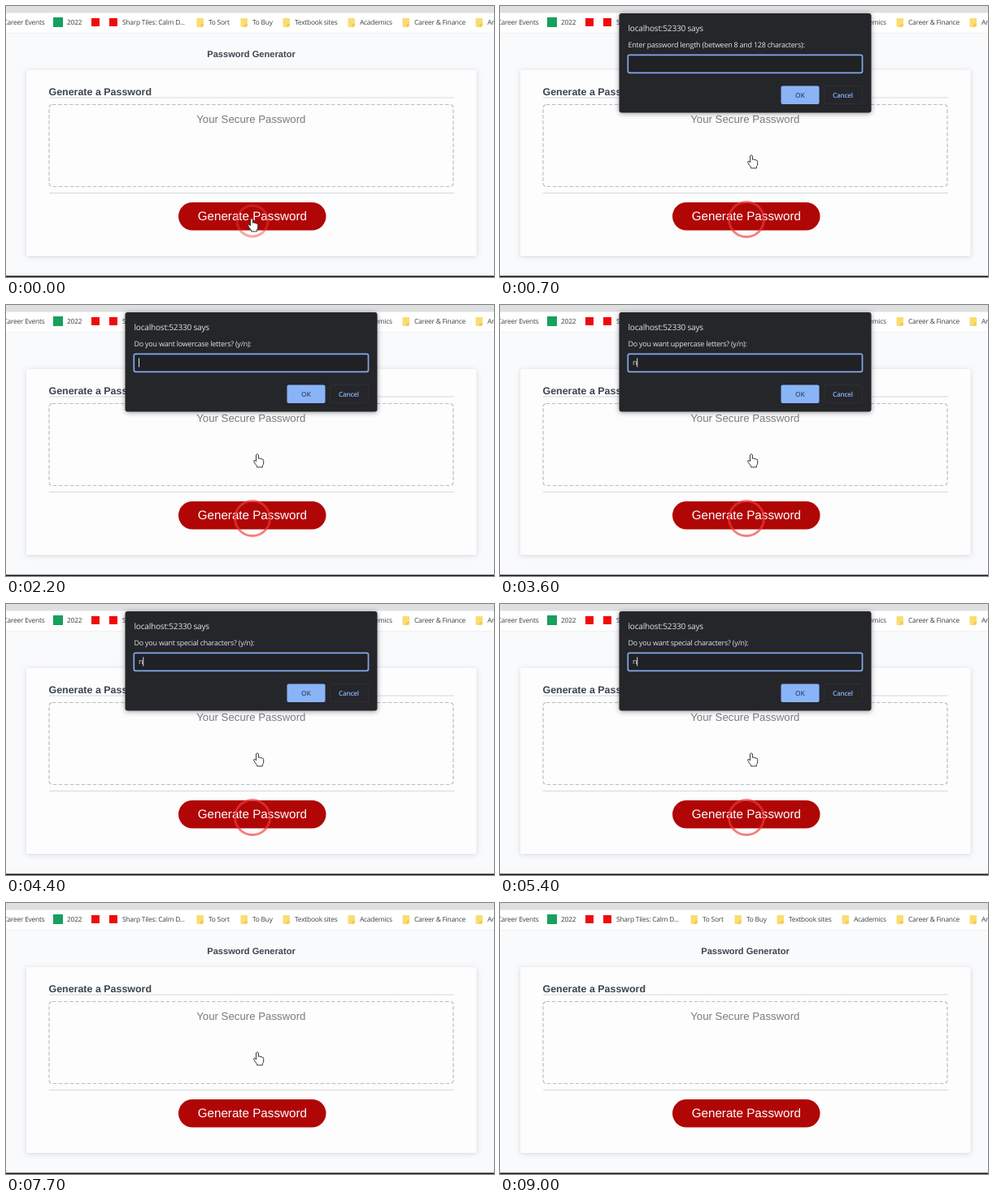
Animation, 600 px wide and 334 px high, one loop 9.2 s. Source, as an HTML page:

```html
<!DOCTYPE html>
<html lang="en">
<head>
<meta charset="utf-8">
<title>Password Generator</title>
<style>
  html, body { margin: 0; width: 100%; height: 100%; overflow: hidden; background: #f9fafc; }
  svg { display: block; width: 600px; height: 334px; }
  text { white-space: pre; text-rendering: geometricPrecision; }
  .ui { font-family: "Open Sans", sans-serif; letter-spacing: -.22px; }
  .page { font-family: "Liberation Sans", Arial, sans-serif; }
  .bold { font-weight: 700; fill: #3d4550; }
  .card { filter: drop-shadow(0 1px 3px rgba(40, 50, 70, .17)); }
  .dialog { filter: drop-shadow(0 1px 3px rgba(0, 0, 0, .4)); }
</style>
</head>
<body>
<svg viewBox="0 0 600 334">
  <rect width="600" height="34" fill="#fff"/>
  <rect width="600" height="8.5" fill="#dedfe0"/>
  <path d="M0 33.5H600" stroke="#eff1f3"/>
  <g id="bookmarks" class="ui" font-size="8.4" fill="#3c4043">
    <rect x="58" y="14" width="12" height="12" fill="#17a05e"/>
    <rect x="105" y="15" width="10" height="10" fill="#f00a0a"/>
    <rect x="127" y="15" width="10" height="10" fill="#f00a0a"/>
  </g>

  <g class="page">
    <text class="bold" x="301.5" y="63" font-size="11.1" text-anchor="middle">Password Generator</text>
    <rect class="card" x="25" y="79" width="553.5" height="229" rx="2" fill="#fdfdfe"/>
    <text class="bold" x="52.5" y="110" font-size="12.45">Generate a Password</text>
    <path d="M53 113H551M53 230.5H551" stroke="#d6d8dc"/>
    <rect x="53" y="121.5" width="497" height="101" rx="4" fill="none" stroke="#bbbcc4" stroke-width="1.2" stroke-dasharray="4.5 2.5"/>
    <text x="301.3" y="144" font-size="13.25" fill="#7b7b7d" text-anchor="middle">Your Secure Password</text>
    <rect x="212" y="242" width="181.5" height="34.5" rx="17.25" fill="#b00606"/>
    <text x="302.8" y="264.3" font-size="15.2" fill="#fff" text-anchor="middle">Generate Password</text>
  </g>
  <rect y="332.5" width="600" height="1.5" fill="#15161a"/>

  <circle id="ring" cx="303" fill="none" stroke="#f03c3c" stroke-width="3"/>

  <g id="dialog" class="ui">
    <rect class="dialog" x="146.5" y="9" width="310" height="122.5" rx="3" fill="#25262a"/>
    <text x="157.5" y="31" font-size="10.1" fill="#e3e4e6">localhost:52330 says</text>
    <text id="question" x="157.5" y="51" font-size="8.95" fill="#e3e4e6"></text>
    <rect x="157.3" y="60.3" width="288.2" height="22" rx="2" fill="#202125" stroke="#83a9ea" stroke-width="1.7"/>
    <text id="entry" x="163" y="74" font-size="8.9" fill="#e3e4e6"></text>
    <path id="caret" d="M.5 65.5V76.5" stroke="#e3e4e6"/>
    <rect x="345.5" y="98.5" width="47" height="22.5" rx="2" fill="#8ab4f8"/>
    <text x="368.8" y="112.7" font-size="8.3" font-weight="600" fill="#3a4a66" text-anchor="middle">OK</text>
    <rect x="398.5" y="98.5" width="47" height="22" rx="2" fill="none" stroke="#2d2f34"/>
    <text x="421.5" y="112.7" font-size="8.2" font-weight="600" fill="#8ab4f8" text-anchor="middle">Cancel</text>
  </g>

  <path id="cursor" fill="#fff" stroke="#303034" stroke-width=".95" stroke-linejoin="round"
    d="M-1.5 1.2Q0-.8 1.4 1.2V5.8Q2.8 4.7 3.9 6.2Q5.2 5.3 6 6.8Q7.4 6.2 7.7 8V11.5Q7.6 13.2 6.4 14.3V16.4H-.4V15Q-2.6 12.6-4.3 9.3Q-4.6 7.6-2.9 7.9L-1.5 9.4Z"/>
</svg>
<script>
const $ = id => document.getElementById(id);
const LOOP = 9200, CLOSE = 6400, HIDE = 8600;

const bookmarks = [
  [75, '2022'], [143, 'Sharp Tiles: Calm D...'], [249, 'To Sort', 1], [303, 'To Buy', 1],
  [355, 'Textbook sites', 1], [435, 'Academics', 1], [502, 'Career & Finance', 1], [592, 'Art', 1]
];
const label = (x, text, anchor = 'start') =>
  `<text x="${x}" y="23.3" text-anchor="${anchor}">${text.replace('&', '&amp;')}</text>`;
const folder = x => `<path d="M${x} 15h7.5q1 0 1 1v9q0 1-1 1h-6.5q-1 0-1-1z" fill="#fbdc72"/>
  <path d="M${x + 5.5} 26v-3h3" fill="none" stroke="#e3b94a"/>`;
$('bookmarks').innerHTML += label(47.5, 'Career Events', 'end') +
  bookmarks.map(([x, text, inFolder]) => label(x, text) + (inFolder ? folder(x - 14.5) : '')).join('');

// Each prompt: opening time, question, then the typed keys and their times.
const ask = what => `Do you want ${what}? (y/n):`;
const prompts = [
  [200, 'Enter password length (between 8 and 128 characters):', '10', [1300, 1500]],
  [1900, ask('lowercase letters'), 'n', [2500]],
  [3000, ask('uppercase letters'), 'n', [3400]],
  [3900, ask('special characters'), 'n', [4200]]
];

const show = (id, on) => $(id).setAttribute('visibility', on ? 'visible' : 'hidden');
const ease = k => k * k * (3 - 2 * k);

function draw(t) {
  const prompt = prompts.filter(p => p[0] <= t).pop();
  const open = prompt && t < CLOSE;
  $('dialog').style.display = open ? '' : 'none';
  if (open) {
    const [start, question, keys, times] = prompt;
    const pressed = times.filter(time => time <= t);
    const lastKey = pressed.length ? pressed[pressed.length - 1] : start;
    $('question').textContent = question;
    $('entry').textContent = keys.slice(0, pressed.length);
    const x = 163 + (pressed.length ? $('entry').getComputedTextLength() : 0);
    $('caret').setAttribute('transform', `translate(${x})`);
    $('caret').style.opacity = (t - lastKey) % 1000 < 500 ? 1 : 0;
  }

  const grow = Math.min(t / 300, 1);
  $('ring').setAttribute('r', 19 + 2.5 * grow);
  $('ring').setAttribute('cy', 265 - 2 * grow);
  $('ring').setAttribute('stroke-opacity', .45 + .2 * grow);
  show('ring', t < CLOSE);

  const move = ease(Math.min(Math.max((t - 100) / 500, 0), 1));
  $('cursor').setAttribute('transform', `translate(${302 + 7 * move} ${261.5 - 78 * move})`);
  show('cursor', t < HIDE);
}

function tick() {
  draw(Math.floor(performance.now() % LOOP / 100) * 100);
  requestAnimationFrame(tick);
}
tick();
</script>
</body>
</html>
```
